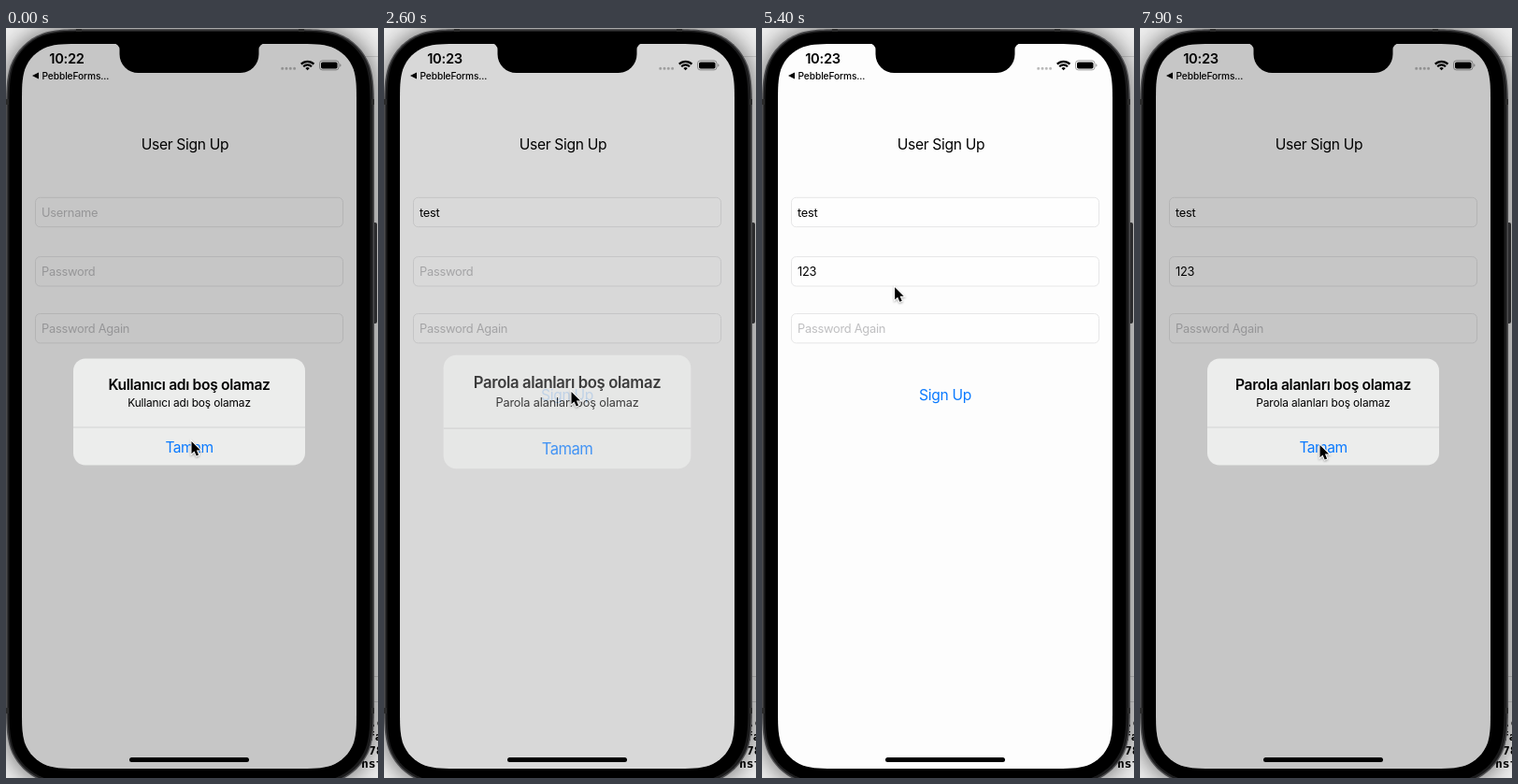
An HTML page for the animation above (8 s loop, 398 by 802 pixels).

```html
<!DOCTYPE html>
<html lang="tr">
<head>
<meta charset="utf-8">
<style>
  html, body { margin: 0; width: 100%; height: 100%; overflow: hidden; background: #dedede; }
  svg { display: block; width: 398px; height: 802px; }
  text { font: 12.85px Inter, "Open Sans", sans-serif; letter-spacing: -.02em; white-space: pre; }
  .large { font-size: 15.6px; }
  .bold { font-weight: 600; }
  .mid { text-anchor: middle; }
  .blue { fill: #0a7aff; }
  .hint { fill: #bfbfc1; }
  .field { fill: #fefefe; stroke: #e6e6e7; }
  .code { font: bold 13px "DejaVu Sans Mono", monospace; letter-spacing: 0; }
</style>
</head>
<body>
<svg viewBox="0 0 398 802">
  <defs>
    <filter id="blur" x="-20%" y="-20%" width="140%" height="140%"><feGaussianBlur stdDeviation="13"/></filter>
  </defs>

  <!-- desktop behind the phone -->
  <rect width="398" height="802" fill="#eee"/>
  <path d="M380 30.500h18M380 693.500h18M380 720.500h18" stroke="#cfcfcf"/>
  <path id="shadow" opacity=".6" filter="url(#blur)"/>
  <g>
    <text class="code" x="389" y="746.500">.o</text>
    <text class="code" x="387" y="761.500">fa</text>
    <text class="code" x="388" y="776.500">78</text>
    <text class="code" x="380" y="791">nst</text>
  </g>

  <!-- phone body -->
  <rect x="391" y="208" width="6" height="108" rx="2" fill="#2b2b2d"/>
  <path id="rim" fill="#4c4c4e"/>
  <path id="band" fill="#1c1c1d"/>
  <path id="bezel"/>
  <path d="M75 1h6v3h-6zM313 1h6v3h-6zM0 76h3v6H0zM391 76h3v6h-3zM0 727h3v6H0zM391 727h3v6h-3z" fill="#2a2a2a"/>

  <!-- screen -->
  <path id="screen" fill="#fdfdfd"/>
  <text id="clock" class="bold mid" x="65" y="38.300" style="font-size:14.7px"></text>
  <path d="M28 51l7-3.500v7z"/>
  <text x="38.500" y="55" style="font-size:10.2px;font-weight:500;letter-spacing:-.01em">PebbleForms...</text>
  <path d="M295.700 43.300h15" stroke="#b9b9b9" stroke-width="3" stroke-linecap="round" stroke-dasharray="0 4.300"/>
  <g fill="none" stroke="#000" stroke-width="2.200">
    <path d="M315.800 38.600a9.600 9.600 0 0 1 13.600 0M318.200 41.300a6.200 6.200 0 0 1 8.800 0"/>
    <path d="M322.600 45.200l-2.200-2.200a3.100 3.100 0 0 1 4.400 0z" fill="#000" stroke="none"/>
  </g>
  <rect x="335.500" y="34.900" width="20.500" height="10" rx="3" fill="none" stroke="#a0a0a0"/>
  <rect x="337" y="36.400" width="17.500" height="7" rx="1.700"/>
  <path d="M357.200 38.200q1.300.4 1.300 1.700t-1.300 1.700z" fill="#a0a0a0"/>

  <text class="large mid" x="191.500" y="129.700">User Sign Up</text>
  <g id="form"></g>
  <rect id="caret" width="2" height="18" rx="1" fill="#4460d8"/>
  <text id="button" class="large mid blue" x="196" y="398">Sign Up</text>
  <rect x="132" y="780" width="128" height="5" rx="2.500"/>
  <path id="dim"/>

  <g id="alert">
    <rect x="72" y="353.500" width="248" height="114" rx="13" fill="#ecedec"/>
    <path id="press" d="M72 427.500h248V454.500a13 13 0 0 1-13 13H85a13 13 0 0 1-13-13z"/>
    <path d="M72 427h248" stroke="#d2d3d3"/>
    <text id="title" class="large bold mid" x="196" y="386.600"></text>
    <text id="message" class="mid" x="196" y="405.200" style="font-size:11.9px;letter-spacing:-.01em"></text>
    <text class="large mid blue" x="196" y="453.600" style="letter-spacing:-.035em">Tamam</text>
  </g>

  <path d="M115 16.500a6.500 6.500 0 0 1 6.500 6.500v5a20 20 0 0 0 20 20h109a20 20 0 0 0 20-20v-5a6.500 6.500 0 0 1 6.500-6.500z"/>
  <path id="cursor" d="M0 0V13.200L3 10.400 5.200 15.400 7.600 14.400 5.400 9.500H9.500Z"
        stroke="#fff" stroke-width="2" paint-order="stroke" style="filter:drop-shadow(0 1px 1px #0005)"/>
</svg>
<script>
const DURATION = 8000, STEP = 100;
const $ = id => document.getElementById(id);
const set = (node, attrs) => { for (const k in attrs) node.setAttribute(k, attrs[k]); };
const within = (t, spans) => spans.some(([a, b]) => t >= a && t < b);

// Rectangle with continuous-curvature corners
function squircle(x0, y0, x1, y1, r) {
  const corner = [[1.5287, 0], [1.0885, 0], [.8684, 0], [.6315, .0749], [.3728, .1691],
    [.1691, .3728], [.0749, .6315], [0, .8684], [0, 1.0885], [0, 1.5287]];
  const at = (x, y, sx, sy, points) => {
    const p = points.map(([a, b]) => [x + sx * a * r, y + sy * b * r]);
    return `${p[0]}C${p.slice(1).join(' ')}`;
  };
  const back = [...corner].reverse();
  return `M${at(x0, y0, 1, 1, corner)}L${at(x0, y1, 1, -1, back)}` +
    `L${at(x1, y1, -1, -1, corner)}L${at(x1, y0, -1, 1, back)}Z`;
}
const screenPath = squircle(17, 17, 375, 792, 43);
const bodyPath = squircle(0, 1, 394, 810, 62);
set($('shadow'), { d: bodyPath });
set($('rim'), { d: bodyPath });
set($('band'), { d: squircle(1.5, 2.5, 392.5, 808.5, 60.5) });
set($('bezel'), { d: squircle(3.5, 4, 389.5, 806, 58) });
set($('screen'), { d: screenPath });
set($('dim'), { d: screenPath });

const fields = [
  { y: 197, hint: 'Username', value: 'test', keys: [1200, 1400, 1600, 1800] },
  { y: 260.3, hint: 'Password', value: '123', keys: [4600, 4800, 5000] },
  { y: 321.2, hint: 'Password Again', value: '', keys: [] },
];
for (const f of fields) {
  $('form').insertAdjacentHTML('beforeend',
    `<rect class="field" x="31.500" y="${f.y - 15.7}" width="329" height="31.400" rx="5"/>
     <text x="38" y="${f.y + 4.7}"></text>`);
  f.text = $('form').lastElementChild;
}

// Alerts: opening and closing time, heading
const alerts = [
  [-1000, 415, 'Kullanıcı adı boş olamaz'],
  [2500, 3452, 'Parola alanları boş olamaz'],
  [6920, 9000, 'Parola alanları boş olamaz'],
];
const carets = [
  [[500, 1000], [1200, 2300], [3500, 4000]],
  [[4000, 5400], [5900, 6500]],
];
// Pointer stops: time, x, y
const stops = [
  [0, 198.5, 442], [200, 198.5, 442], [500, 130, 267.5], [1800, 130, 267.5],
  [2300, 200.5, 389], [2600, 200.5, 389], [3000, 196, 443], [3300, 196, 443],
  [3600, 139.5, 285], [3800, 136, 263], [5300, 136, 263], [5800, 195, 401],
  [6000, 192.5, 392], [7200, 192.5, 392], [7500, 192.5, 441], [7700, 192.5, 441],
  [7900, 192.5, 446], [8000, 192.5, 446],
];

const smooth = u => u * u * (3 - 2 * u);
// Critically damped spring, time in ms
const spring = ms => ms <= 0 ? 0 : 1 - (1 + ms * .0228) * Math.exp(-ms * .0228);

function pointerAt(t) {
  const i = stops.findIndex(s => s[0] > t);
  const [t0, x0, y0] = stops[i - 1], [t1, x1, y1] = stops[i];
  const u = smooth((t - t0) / (t1 - t0));
  return [x0 + (x1 - x0) * u, y0 + (y1 - y0) * u];
}

function render(t) {
  $('clock').textContent = t < 1600 ? '10:22' : '10:23';

  set($('caret'), { opacity: 0 });
  fields.forEach((f, i) => {
    const typed = f.value.slice(0, f.keys.filter(k => k <= t).length);
    f.text.textContent = typed || f.hint;
    f.text.setAttribute('class', typed ? '' : 'hint');
    if (carets[i] && within(t, carets[i])) {
      const width = typed ? f.text.getComputedTextLength() : 0;
      set($('caret'), { opacity: 1, x: 38 + width, y: f.y - 9 });
    }
  });

  const [open, close, heading] = alerts.findLast(a => a[0] <= t);
  const shown = spring(t - open), left = 1 - spring(t - close);
  const alpha = shown * left;
  const scale = 1.2 - .2 * shown;
  set($('dim'), { opacity: .22 * alpha });
  set($('alert'), {
    opacity: alpha ** .8,
    transform: `translate(196 410.500) scale(${scale}) translate(-196 -410.500)`,
  });
  $('title').textContent = $('message').textContent = heading;
  set($('press'), { opacity: within(t, [[200, 400], [3300, 3500]]) ? .08 : 0 });
  const pressed = within(t, [[2300, 2500], [6600, 6800]]);
  set($('button'), { opacity: pressed ? .3 : 1 - .5 * alpha });
  set($('cursor'), { transform: `translate(${pointerAt(t)})` });
}

function tick() {
  const t = performance.now() % DURATION;
  render(Math.floor(t / STEP) * STEP);
  requestAnimationFrame(tick);
}
tick();
</script>
</body>
</html>
```
